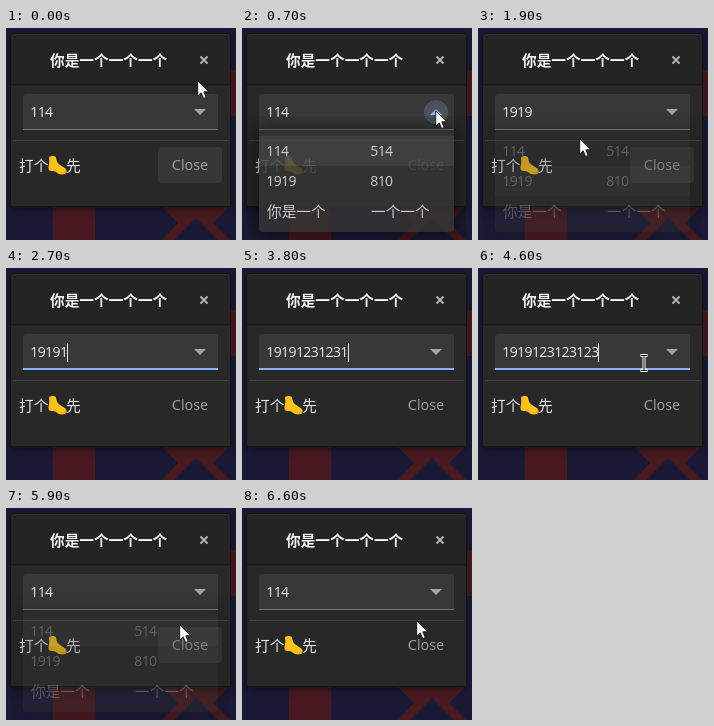
Animation of 230 by 212 pixels, one loop 6.7 s. Source, as an HTML page:

```html
<!DOCTYPE html>
<html lang="zh">
<head>
<meta charset="utf-8">
<title>Combo box dialog</title>
<style>
html, body { margin: 0; width: 100%; height: 100%; overflow: hidden; background: #1b1a36; }
#stage {
  --digit: 7.4px;
  position: relative; width: 230px; height: 212px; overflow: hidden;
  font: 14px/20px "Open Sans", "Noto Sans CJK SC", "Noto Sans CJK", sans-serif;
  letter-spacing: -.6px; color: #e9e9e9; white-space: nowrap;
}
#stage * { position: absolute; box-sizing: border-box; }
#stage .anim { animation: 6.7s step-end infinite; }
.zh { font-size: 14.67px; letter-spacing: 0; font-family: "Noto Sans CJK SC", "Noto Sans CJK", sans-serif; }
svg { left: 0; top: 0; overflow: visible; }

#window {
  left: 5px; top: 6px; width: 219px; height: 172px; border-radius: 4px 4px 0 0;
  background: #282828; box-shadow: 0 0 0 1px #141419, 0 3px 9px rgba(0, 0, 0, .5);
}
#header {
  left: 5px; top: 6px; width: 219px; height: 50px; border-radius: 4px 4px 0 0;
  background: #242424; box-shadow: inset 0 1px #303030, 0 1px 2px #141414;
}
#title { left: 44px; top: 22px; font-weight: 700; color: #f4f4f4; }
#combo { left: 17px; top: 66px; width: 195px; height: 36px; border-radius: 4px 4px 0 0; background: #383838; }
#line { left: 17px; top: 101px; width: 195px; height: 1px; background: #767676; }
#stage #focus { left: 17px; top: 100px; width: 195px; height: 2px; background: #8ab4f8; animation-name: focus; }
#rule { left: 7px; top: 112px; width: 215px; height: 1px; background: #424242; }
#stage #button { left: 152px; top: 119px; width: 64px; height: 36px; border-radius: 4px; background: #373737; animation-name: button; }
#close { left: 152px; top: 127px; width: 64px; text-align: center; font-size: 14.4px; letter-spacing: 0; color: #a2a2a2; }

#stage #first { left: 24.3px; top: 74px; animation-name: first; }
#stage #typed {
  left: 24.3px; top: 75px; height: 19px; line-height: 18px; overflow: hidden;
  box-sizing: content-box; border-right: 1px solid transparent;
  animation-name: type, caret;
}

#stage #surface { left: 5px; top: 88px; width: 219px; height: 124px; overflow: hidden; animation-name: popup; }
#menu {
  left: 12px; top: 14px; width: 195px; height: 102px; border-radius: 0 0 4px 4px;
  background: #343434; box-shadow: 0 2px 20px 6px rgba(0, 0, 0, .5);
}
#stage #hover { left: 0; top: 6px; width: 195px; height: 30px; background: #444; animation-name: hover; }
#menu span { left: 7.3px; }
#menu span:nth-of-type(even) { left: 111.3px; }
#menu .zh { left: 8px; }
#menu .zh:nth-of-type(even) { left: 112px; }

#stage #down { animation-name: closed; }
#stage #up { animation-name: opened; }
#stage #arrow { animation-name: move, arrow; }
#stage #beam { animation-name: beam-move, beam; }

@keyframes move {
  0% { transform: translate(191px, 52px); }
  1.49% { transform: translate(191px, 52px); animation-timing-function: steps(4); }
  7.46% { transform: translate(193px, 82px); }
  11.94% { transform: translate(193px, 82px); animation-timing-function: steps(3); }
  16.41% { transform: translate(149px, 108px); animation-timing-function: steps(4); }
  22.38% { transform: translate(92px, 146px); }
  23.88% { transform: translate(92px, 146px); animation-timing-function: steps(3); }
  28.35% { transform: translate(101px, 110px); animation-timing-function: steps(3); }
  32.83% { transform: translate(112px, 88px); }
  71.64% { transform: translate(187px, 89px); animation-timing-function: steps(3); }
  76.11% { transform: translate(199px, 84px); animation-timing-function: steps(3); }
  80.59% { transform: translate(181px, 102px); animation-timing-function: steps(2); }
  83.58% { transform: translate(172px, 118px); }
  86.56% { transform: translate(172px, 118px); animation-timing-function: steps(3); }
  91.04% { transform: translate(175px, 112px); }
  94.02%, 100% { transform: translate(174px, 112px); }
}
@keyframes arrow {
  0% { opacity: 1; }
  31.34% { opacity: 0; }
  71.64%, 100% { opacity: 1; }
}
@keyframes beam-move {
  0% { transform: translate(110px, 92px); }
  32.83% { transform: translate(112px, 87px); }
  64.17% { transform: translate(164px, 95px); }
  65.67% { transform: translate(166px, 95px); }
  68.65% { transform: translate(166px, 95px); animation-timing-function: steps(2); }
  71.64%, 100% { transform: translate(187px, 89px); }
}
@keyframes beam {
  0% { opacity: 0; }
  31.34% { opacity: 1; }
  37.31% { opacity: 0; }
  64.17% { opacity: 1; }
  71.64%, 100% { opacity: 0; }
}
@keyframes popup {
  0% { opacity: 0; }
  8.95% { opacity: .4; }
  10.44% { opacity: .87; }
  11.94% { opacity: 1; }
  25.37% { opacity: .85; }
  26.86% { opacity: .55; }
  28.35% { opacity: .3; }
  29.85% { opacity: 0; }
  77.61% { opacity: .15; }
  79.10% { opacity: .55; }
  80.59% { opacity: .84; }
  82.08% { opacity: 1; }
  86.56% { opacity: .65; }
  88.05% { opacity: .3; }
  89.55%, 100% { opacity: 0; }
}
@keyframes hover {
  0% { transform: none; }
  19.40% { transform: translateY(30px); }
  31.34%, 100% { transform: none; }
}
@keyframes opened {
  0% { opacity: 0; }
  8.95% { opacity: 1; }
  25.37% { opacity: 0; }
  77.61% { opacity: 1; }
  86.56%, 100% { opacity: 0; }
}
@keyframes closed {
  0% { opacity: 1; }
  8.95% { opacity: 0; }
  25.37% { opacity: 1; }
  77.61% { opacity: 0; }
  86.56%, 100% { opacity: 1; }
}
@keyframes focus {
  0% { opacity: 0; }
  32.83% { opacity: .2; }
  34.32% { opacity: .7; }
  35.82% { opacity: 1; }
  74.62% { opacity: .5; }
  76.11%, 100% { opacity: 0; }
}
@keyframes button {
  0% { opacity: 1; }
  8.95% { opacity: 0; }
  25.37% { opacity: 1; }
  32.83% { opacity: 0; }
  86.56% { opacity: 1; }
  98.50%, 100% { opacity: 0; }
}
@keyframes first {
  0% { opacity: 1; }
  25.37% { opacity: 0; }
  86.56%, 100% { opacity: 1; }
}
@keyframes type {
  0% { width: 0; }
  25.37% { width: calc(4 * var(--digit)); }
  38.80% { width: calc(4 * var(--digit)); animation-timing-function: steps(7); }
  49.25% { width: calc(11 * var(--digit)); }
  50.74% { width: calc(9 * var(--digit)); }
  52.23% { width: calc(8 * var(--digit)); }
  53.73% { width: calc(10 * var(--digit)); }
  56.71% { width: calc(11 * var(--digit)); }
  59.70% { width: calc(12 * var(--digit)); }
  62.68% { width: calc(13 * var(--digit)); }
  86.56%, 100% { width: 0; }
}
@keyframes caret {
  0% { border-color: transparent; }
  34.32% { border-color: #e0e0e0; }
  76.11%, 100% { border-color: transparent; }
}
</style>
</head>
<body>
<div id="stage">
  <svg width="230" height="212">
    <path fill="#1b1a36" d="M0 0H230V212H0Z"/>
    <path fill="#481a20" d="M47 160H89V212H47ZM224 42H230V88H224ZM155 165H224V178L207 195L224 212H212L190 190L168 212H156L172 195L155 178Z"/>
  </svg>

  <div id="window"></div>
  <div id="header"></div>
  <div id="title" class="zh">你是一个一个一个</div>
  <svg width="230" height="212">
    <path d="M194.5 28.5L201.5 35.5M201.5 28.5L194.5 35.5" stroke="#b2b2b2" stroke-width="2"/>
  </svg>

  <div id="combo"></div>
  <div id="line"></div>
  <div id="focus" class="anim"></div>
  <div id="first" class="anim">114</div>
  <div id="typed" class="anim">1919123123123</div>
  <svg id="down" class="anim" width="230" height="212">
    <path fill="#a5a5a5" d="M188 81H200L194 87Z"/>
  </svg>
  <svg id="up" class="anim" width="230" height="212">
    <circle cx="194" cy="84" r="12" fill="#4d535d"/>
    <path fill="#8ab4f8" d="M188 87H200L194 81Z"/>
  </svg>

  <div id="rule"></div>
  <div class="zh" style="left:13px;top:127px">打个</div>
  <svg width="230" height="212">
    <path fill="#ffc21c" d="M43 129Q46.5 127 50 129Q50 134 54 137L59.5 140.5Q62 144.5 59 146Q55 147 52 145.5Q49 142.5 46.5 143Q42 143.5 42.5 139Q44 134 43 129Z"/>
    <path fill="none" stroke="#e59600" stroke-width=".7" d="M55 146L56 144M57.4 146.2L58 144M59.4 145L59 143"/>
  </svg>
  <div class="zh" style="left:60px;top:127px">先</div>
  <div id="button" class="anim"></div>
  <div id="close">Close</div>

  <div id="surface" class="anim">
    <div id="menu">
      <div id="hover" class="anim"></div>
      <span style="top:11px">114</span><span style="top:11px">514</span>
      <span style="top:41px">1919</span><span style="top:41px">810</span>
      <span class="zh" style="top:71px">你是一个</span><span class="zh" style="top:71px">一个一个</span>
    </div>
  </div>

  <svg id="beam" class="anim" width="10" height="18">
    <g fill="none">
      <path stroke="#fff" stroke-width="3" d="M-3.5 -7.5H3.5M0 -7.5V7.5M-3.5 7.5H3.5"/>
      <path stroke="#111" d="M-3 -7.5H3M0 -7.5V7.5M-3 7.5H3"/>
    </g>
  </svg>
  <svg id="arrow" class="anim" width="12" height="20">
    <path fill="#fff" stroke="#111" stroke-width=".9" d="M.7 .8V16L4.2 12.8L6.6 18.5L9.2 17.4L6.8 11.8H11.6Z"/>
  </svg>
</div>
</body>
</html>
```
